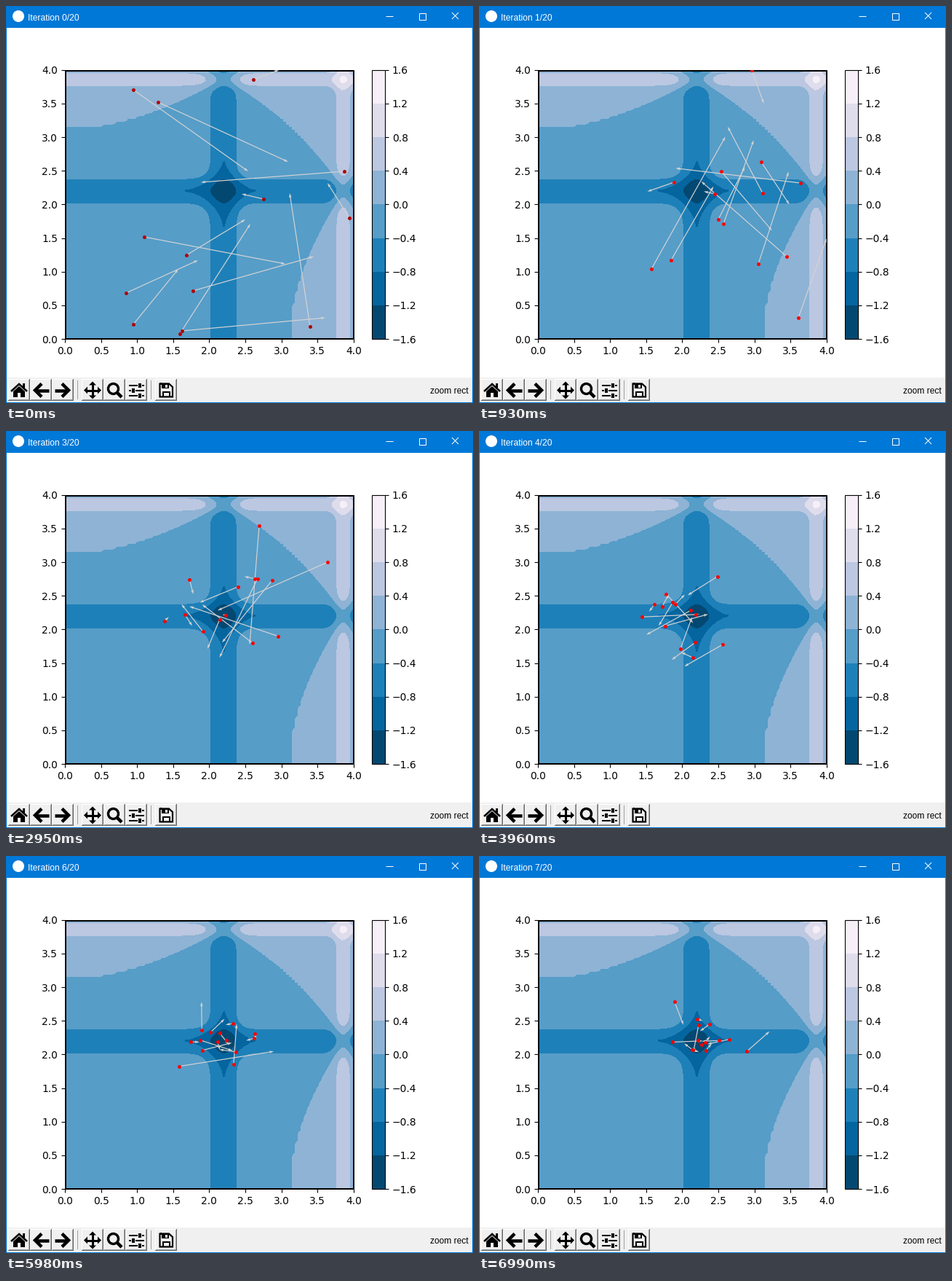
A matplotlib script that plays this animation: 642 px wide and 545 px high, repeating every 8 s.

```python
import numpy as np
import matplotlib.pyplot as plt
from matplotlib.animation import FuncAnimation
from matplotlib.patches import Rectangle, Polygon, Circle

W, H, DPI = 642, 545, 100
STEP, FRAMES = 50, 160          # ms per tick, ticks per loop
FIRST, HOLD = 930, 1010         # ms of the first and of later iterations
PT = 72 / DPI

LEFT, TOP, WIDTH, HEIGHT = 81, 87.6, 396.8, 369.6   # plot area in pixels
INERTIA, OWN, SHARED = 0.5, 0.6, 1.6                # swarm weights

# Where the particles start and where their first move takes them, in pixels
START = [(175, 115), (209, 132), (340, 101), (465, 227), (354, 265), (472, 291), (190, 317),
         (248, 342), (257, 391), (165, 394), (175, 437), (239, 450), (242, 446), (418, 440)]
MOVED = [(333, 227), (388, 214), (375, 88), (268, 242), (324, 258), (442, 243), (384, 354),
         (329, 293), (423, 344), (264, 349), (237, 361), (336, 299), (439, 428), (390, 257)]


def michalewicz(x, y, m=10):
    def term(v):
        return np.sin(v) * np.sin(v ** 2 / np.pi) ** (2 * m)
    return -term(x) - term(y)


def cost(points):
    x, y = points.T
    return michalewicz((x - LEFT) / WIDTH * 4, (TOP + HEIGHT - y) / HEIGHT * 4)


def fly(start, moved, moves, seed):
    """Particle swarm: each one is drawn to its own and to the shared best point."""
    rng = np.random.default_rng(seed)
    path = [np.array(start, float), np.array(moved, float)]
    best = path[0]
    while len(path) <= moves:
        x, v = path[-1], path[-1] - path[-2]
        best = np.where((cost(x) < cost(best))[:, None], x, best)
        lead = best[cost(best).argmin()]
        r1, r2 = rng.random((2, *x.shape))
        x = x + INERTIA * v + OWN * r1 * (best - x) + SHARED * r2 * (lead - x)
        path.append(np.clip(x, (LEFT, TOP), (LEFT + WIDTH, TOP + HEIGHT)))
    return path


fig = plt.figure(figsize=(W / DPI, H / DPI), dpi=DPI, facecolor="white")


def px_axes(x, top, w, h):
    return fig.add_axes([x / W, 1 - (top + h) / H, w / W, h / H])


# Contour plot and colour bar
ax = px_axes(LEFT, TOP, WIDTH, HEIGHT)
side = np.linspace(0, 4, 100)
X, Y = np.meshgrid(side, side)
levels = np.linspace(-1.6, 1.6, 9)
contours = ax.contourf(X, Y, michalewicz(X, Y), levels, cmap="PuBu_r")
ax.set(xlim=(0, 4), ylim=(0, 4), xticks=np.arange(0, 4.1, 0.5), yticks=np.arange(0, 4.1, 0.5))
ax.spines[:].set_visible(False)
fig.colorbar(contours, cax=px_axes(502.6, TOP, HEIGHT / 20, HEIGHT), ticks=levels)

# Stage in pixels, y downwards
stage = fig.add_axes([0, 0, 1, 1], zorder=5)
stage.set(xlim=(0, W), ylim=(H, 0))
stage.axis("off")


def box(x, y, w, h, color):
    stage.add_patch(Rectangle((x, y), w, h, fc=color, lw=0))


def outline(x, y, w, h, color, width):
    stage.add_patch(Rectangle((x, y), w, h, fill=False, ec=color, lw=width * PT))


def line(points, color="black", width=1.0):
    stage.plot(*zip(*points), color=color, lw=width * PT, solid_capstyle="butt",
               solid_joinstyle="miter")


def shape(points, color="black"):
    stage.add_patch(Polygon(points, fc=color, lw=0, zorder=3))


def label(x, y, text, **kw):
    return stage.text(x, y, text, family="Liberation Sans", size=12 * PT,
                      va="center_baseline", **kw)


# Window frame
BLUE, GREY = "#0078d7", "#f0f0f0"
box(0, 0, W, 30, BLUE)
box(0, 510, W, 35, GREY)
box(0, 30, 1, H - 30, BLUE)
box(W - 1, 30, 1, H - 30, BLUE)
box(0, H - 1, W, 1, BLUE)
stage.add_patch(Circle((17, 14), 8, fc="white", lw=0))
title = label(30, 15, "", color="white")
label(636, 527, "zoom rect", ha="right")
line([(522, 13.5), (532, 13.5)], "white")
outline(567.5, 9.5, 9, 9, "white", 1)
line([(613, 9), (622, 18)], "white")
line([(613, 18), (622, 9)], "white")
outline(82, 89, 396, 368, "black", 2)


# Toolbar
def button(cx):
    x, y = cx - 15, 512
    box(x, y, 30, 30, "#696969")
    box(x, y, 29, 29, "white")
    box(x + 1, y + 1, 28, 28, "#a0a0a0")
    box(x + 1, y + 1, 27, 27, GREY)


def arrow(cx, d, cy=527.5):
    line([(cx + d, cy - 9), (cx - 8 * d, cy), (cx + d, cy + 9)], width=4.5)
    line([(cx - 7 * d, cy), (cx + 11 * d, cy)], width=4.5)


for cx in (18, 48, 78, 119, 149, 179, 220):
    button(cx)
for x in (98, 199):
    box(x, 514, 1, 26, "#a0a0a0")

line([(7, 529), (18, 519), (29, 529)], width=2.6)
shape([(10, 529), (18, 522), (26, 529), (26, 537), (20, 537), (20, 531),
       (16, 531), (16, 537), (10, 537)])
box(23, 518, 3, 6, "black")

arrow(48, 1)
arrow(78, -1)

line([(110, 527.5), (128, 527.5)], width=3)
line([(119, 519), (119, 536)], width=3)
for ux, uy in ((1, 0), (-1, 0), (0, 1), (0, -1)):
    tip = np.array([119 + 12 * ux, 527.5 + 12 * uy])
    back, across = np.array([ux, uy]) * 5, np.array([uy, ux]) * 5
    shape([tip, tip - back + across, tip - back - across])

stage.add_patch(Circle((147.5, 525.5), 7, fill=False, ec="black", lw=3.4 * PT))
line([(152, 530), (159, 537)], width=4.5)

for y, knob in ((520, 182), (527, 173), (534, 182)):
    box(169, y, 21, 2, "black")
    box(knob - 1, y - 3, 6, 8, GREY)
    box(knob, y - 2, 4, 6, "black")

line([(212, 518.5), (224, 518.5), (229, 523), (229, 536.5), (211.5, 536.5),
      (211.5, 518.5), (214, 518.5)], width=2.2)
box(214, 519, 10, 6, "black")
box(219, 520, 3, 4, GREY)
line([(215.5, 536), (215.5, 529.5), (225, 529.5), (225, 536)], width=2)

# Swarm
swarm = fly(START, MOVED, moves=8, seed=7)
arrows = []
for here, there in zip(swarm, swarm[1:]):
    q = stage.quiver(*here.T, *(there - here).T, angles="xy", scale_units="xy", scale=1,
                     units="dots", width=1.2, color="lightgray", zorder=4)
    q.set_clip_path(ax.patch)
    arrows.append(q)
dots, = stage.plot([], [], "o", ms=3.6, mew=0, zorder=5)
dots.set_clip_path(ax.patch)


def update(tick):
    it = (tick * STEP + STEP - 1 + HOLD - FIRST) // HOLD
    title.set_text(f"Iteration {it}/20")
    dots.set_data(*swarm[it].T)
    dots.set_color("red" if it else "#b00000")
    for i, q in enumerate(arrows):
        q.set_visible(i == it)
    return [title, dots, *arrows]


anim = FuncAnimation(fig, update, frames=FRAMES, interval=STEP, repeat=True, repeat_delay=0)
plt.show()
```
